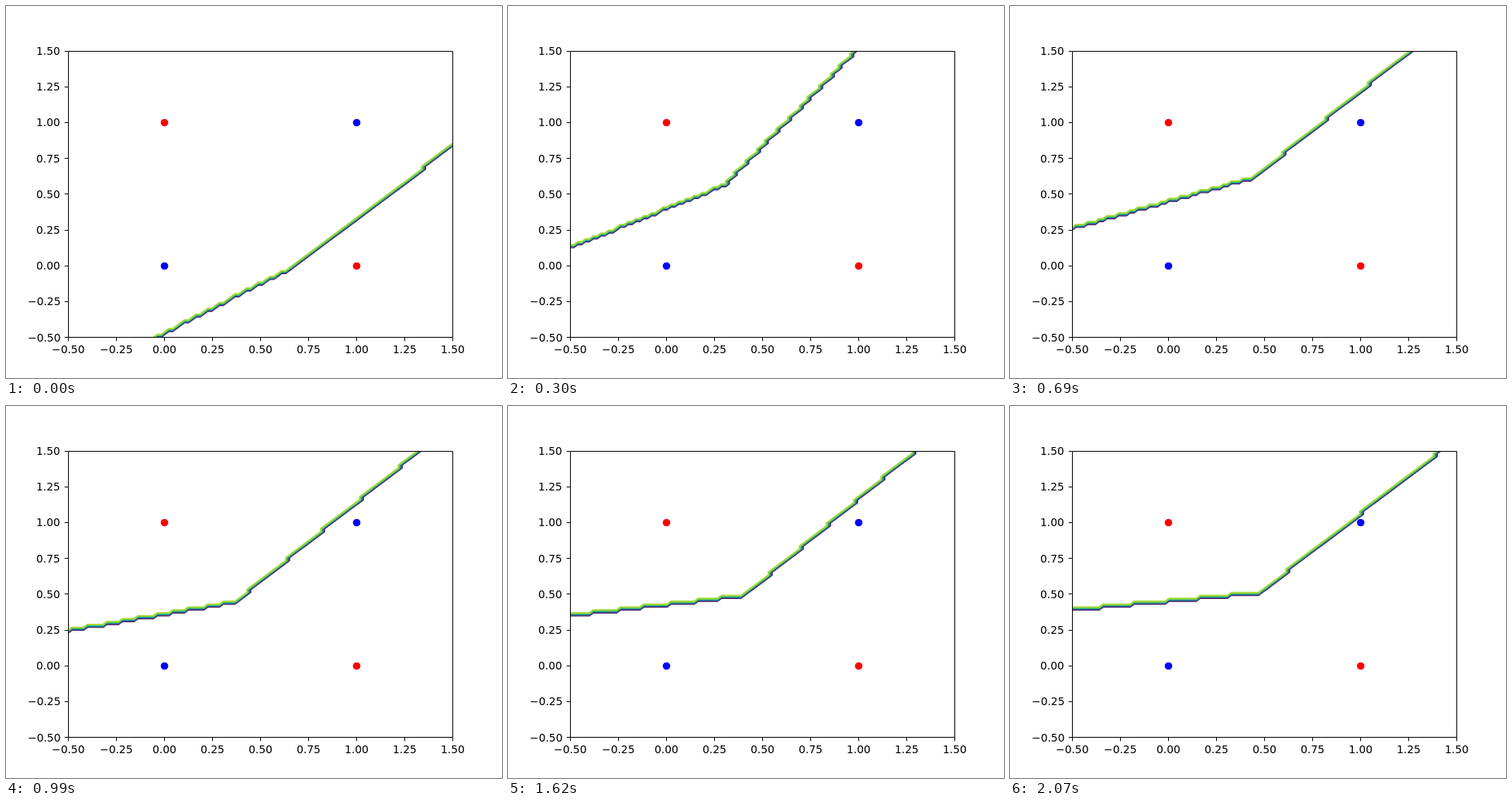
An HTML page for the animation above (2100 ms loop, 640 px wide and 480 px high).

```html
<!DOCTYPE html>
<html lang="en">
<head>
<meta charset="utf-8">
<title>Decision boundary</title>
<style>
  html, body { margin: 0; width: 100%; height: 100%; overflow: hidden; background: #fff; }
  svg { display: block; width: 640px; height: 480px; }
  text { font: 13.889px "DejaVu Sans", sans-serif; }
  .contour path { fill: none; stroke-width: 2.083; stroke-linejoin: round; }
  .axes path { fill: none; stroke: #000; }
</style>
</head>
<body>
<svg viewBox="0 0 640 480">
  <clipPath id="plot"><rect x="80.5" y="58.5" width="496" height="369"/></clipPath>
  <g class="contour" clip-path="url(#plot)"></g>
  <g class="dots"></g>
  <g class="axes"></g>
</svg>
<script>
const LOOP = 2100, STEP = 30, CELLS = 99;
const LEFT = 80, BOTTOM = 427.2, WIDTH = 496, HEIGHT = 369.6;
const COLORS = ['#440154', '#46327e', '#365c8d', '#277f8e', '#1fa187', '#4ac16d', '#a0da39'];

// Key poses in grid cells: time, height at the left edge, slope of the flat line,
// column where the steep line meets the top, slope of the steep line
const POSES = [
  [0, -15.63, 0.6894, 131.2, 1.02],
  [300, 31.054, 0.5405, 73.62, 1.3704],
  [690, 37.663, 0.3745, 87.04, 1.0909],
  [990, 36.861, 0.2309, 90.47, 1.1031],
  [1080, 39.3, 0.22, 99, 1.02],
  [1290, 45.68, 0.2907, 73.86, 1.3106],
  [1620, 42.158, 0.1504, 88.91, 1.137],
  [2070, 44.067, 0.1212, 94.92, 1.0526]
];

function add(parent, name, attrs, text) {
  const el = document.createElementNS('http://www.w3.org/2000/svg', name);
  for (const key in attrs) el.setAttribute(key, attrs[key]);
  if (text) el.textContent = text;
  return document.querySelector(parent).appendChild(el);
}

const snap = v => Math.round(v) + 0.5;
const dataX = x => LEFT + (x + 0.5) / 2 * WIDTH;
const dataY = y => BOTTOM - (y + 0.5) / 2 * HEIGHT;

// Text starts on a whole pixel; align is 0.5 for centred, 1 for right-aligned
function addLabel(text, x, y, align) {
  const el = add('.axes', 'text', { y: Math.round(y) }, text);
  el.setAttribute('x', Math.round(x - align * el.getComputedTextLength()));
}

function drawAxes() {
  add('.axes', 'path', { d: 'M80.5 58.5H576.5V427.5H80.5Z' });
  for (let value = -0.5; value <= 1.5; value += 0.25) {
    const x = dataX(value), y = dataY(value);
    const label = value.toFixed(2).replace('-', '\u2212');
    add('.axes', 'path', { d: `M${snap(x)} 427.5v4.86M80.5 ${snap(y)}h-4.86` });
    addLabel(label, x, 448, 0.5);
    addLabel(label, 70.3, y + 5.45, 1);
  }
}

function drawDots() {
  for (const x of [0, 1]) for (const y of [0, 1]) {
    add('.dots', 'circle', {
      cx: snap(dataX(x)), cy: snap(dataY(y)), r: 4.86, fill: x === y ? '#00f' : '#f00'
    });
  }
}

function poseAt(t) {
  const n = Math.max(1, POSES.findIndex(pose => pose[0] >= t));
  const a = POSES[n - 1], b = POSES[n], f = (t - a[0]) / (b[0] - a[0]);
  return a.map((v, i) => v + (b[i] - v) * f);
}

// Isoline of a 0/1 grid whose ones begin just above each column's row
function isoline(rows, level) {
  const points = [];
  const push = (u, v) => points.push(
    (LEFT + u * WIDTH / CELLS).toFixed(2) + ' ' + (BOTTOM - v * HEIGHT / CELLS).toFixed(2));
  for (let u = 0; u <= CELLS; u++) {
    const row = rows[u];
    if (u) for (let v = rows[u - 1] + 1; v <= Math.min(row, CELLS); v++) push(u - level, v);
    if (row >= CELLS) break;
    push(u, row + level);
  }
  return 'M' + points.join('L');
}

drawAxes();
drawDots();
const lines = COLORS.map(stroke => add('.contour', 'path', { stroke }));

let shown = -1;
const start = performance.now();
function frame(now) {
  const t = Math.floor(Math.max(0, now - start) % LOOP / STEP) * STEP;
  if (t !== shown) {
    shown = t;
    const [, height, flat, top, steep] = poseAt(t);
    const rows = Array.from({ length: CELLS + 1 },
      (_, u) => Math.floor(Math.max(height + flat * u, CELLS + steep * (u - top))));
    lines.forEach((line, i) => line.setAttribute('d', isoline(rows, i * 0.15)));
  }
  requestAnimationFrame(frame);
}
frame(start);
</script>
</body>
</html>
```
